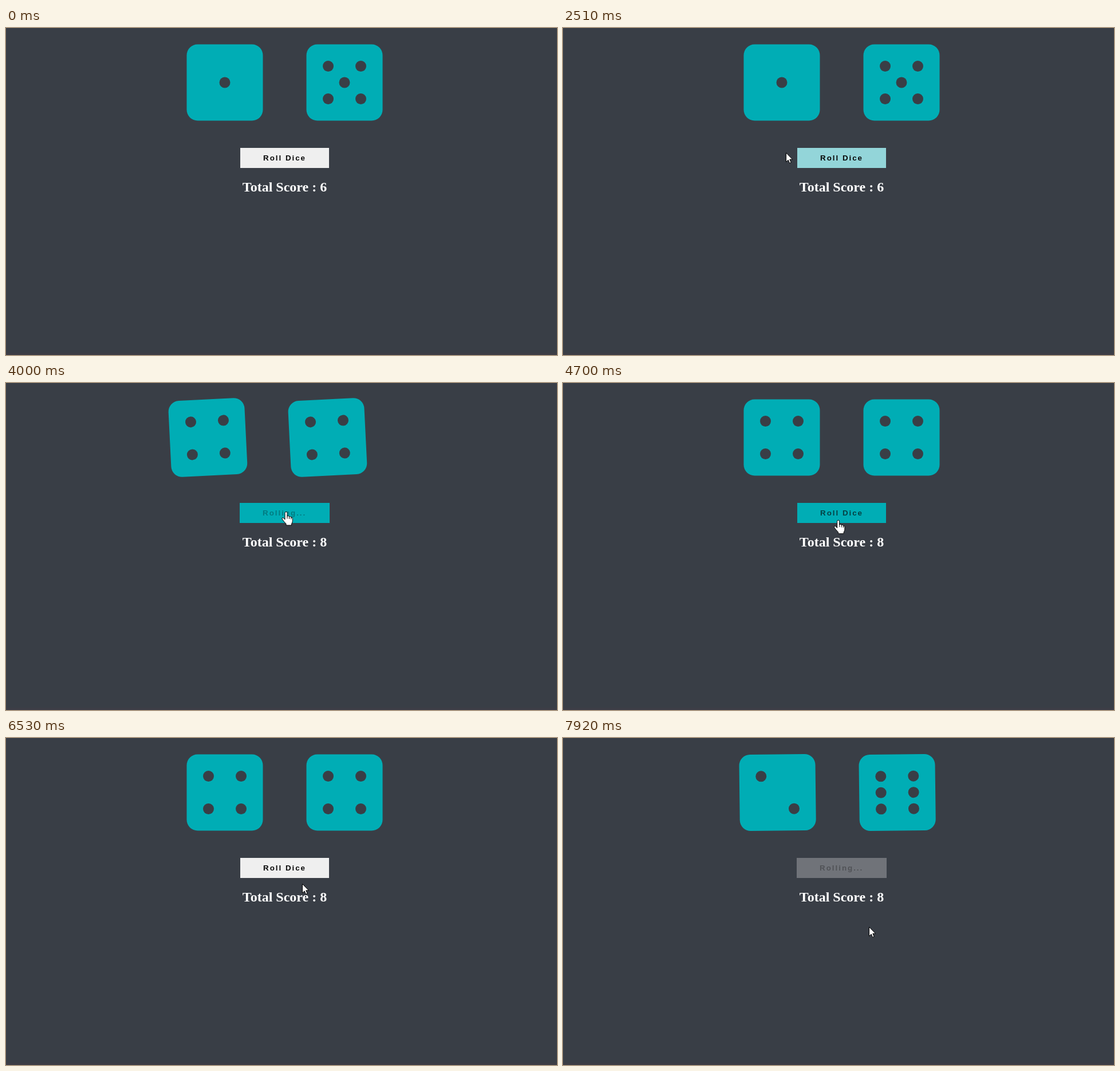
Recreate the animation shown at these times as an HTML page. Size 962 by 570 pixels, loop 7.99 s.

```html
<!DOCTYPE html>
<html lang="en">
<head>
<meta charset="utf-8">
<title>Roll Dice</title>
<style>
  html, body { margin: 0; width: 100%; height: 100%; overflow: hidden; background: #393e46; }
  svg { display: block; }
  #label { font: bold 13.333px "Liberation Sans", Arial, sans-serif; letter-spacing: 2px; }
  #score { font: bold 24px "Liberation Serif", "Times New Roman", serif; fill: #fff; text-anchor: middle; }
  .die rect { fill: #00adb5; }
  .die circle { fill: #393e46; }
  .cursor { fill: #fff; stroke: #000; stroke-linejoin: round; }
</style>
</head>
<body>
<svg width="962" height="570" viewBox="0 0 962 570">
  <rect width="962" height="570" fill="#393e46"/>
  <rect y="566" width="962" height="4" fill="#3d3d46"/>
  <g class="die"></g>
  <g class="die"></g>
  <rect id="button" y="209" height="35"/>
  <text id="label" y="231"></text>
  <text id="score" x="486.5" y="285"></text>
  <path id="arrow" class="cursor" d="M.5 .5V16.3L4.2 12.9 6.6 18.4 9.2 17.3 6.8 11.9H11.6Z"/>
  <g id="hand" class="cursor">
    <path d="M-2 2a2 2 0 0 1 4 0v5.5q2.5-1 3.5.8 2.6-.6 3.3 1.2 2.5 0 2.5 2.5v4q0 2.5-1.8 5v2.5h-9.5v-2.5q-4.5-4.5-7-8.5-.5-2.5 2-2.2l3 3.2z"/>
    <path d="M2 7v5M5.5 8.5v4M8.7 9.5v3.5" fill="none"/>
  </g>
</svg>
<script>
const LOOP = 7990, FADE = 400, ROLL = 1000;
const $ = id => document.getElementById(id);
const dice = [...document.querySelectorAll('.die')];
const FIRST_DIE = 382, DIE_SPAN = 209;

const rolls = [
  { start: -ROLL, faces: [1, 5] },
  { start: 3581, faces: [4, 4] },
  { start: 7121, faces: [2, 6] },
];

// Pointer's turning points: ms, x, y
const path = [
  [120, 891, 553], [610, 600, 90], [850, 364, 88], [950, 361, 90], [1370, 658, 79],
  [1650, 585, 203], [1790, 562, 218], [2372, 408, 218], [2510, 389, 217], [2700, 394, 250],
  [2950, 430, 290], [3330, 489, 224.5], [4450, 489, 224.5], [4750, 479, 242], [5100, 485, 243],
  [5450, 564, 300], [5800, 564, 298], [6530, 517, 254], [6800, 505, 230], [7130, 505, 230],
  [7390, 570, 278], [7920, 534, 329],
];

const clamp = v => Math.min(1, Math.max(0, v));
const mix = (a, b, p) => a + (b - a) * p;

// CSS "ease": cubic-bezier(.25, .1, .25, 1)
function ease(u) {
  if (u <= 0 || u >= 1) return clamp(u);
  const curve = (a, b, s) => 3 * a * s * (1 - s) ** 2 + 3 * b * s * s * (1 - s) + s ** 3;
  let low = 0, high = 1;
  for (let i = 0; i < 24; i++) {
    const s = (low + high) / 2;
    if (curve(.25, .25, s) < u) low = s; else high = s;
  }
  return curve(.1, 1, low);
}

// Six swings of alternating side and shrinking size; the last settles more slowly
function wobble(u) {
  const swing = k => k ? (-1) ** k * (.3 - .05 * k) : 0;
  const tilt = k => Math.min(3, 20 * swing(k));
  const k = Math.min(5, Math.floor(u / .15));
  const p = ease((u - k * .15) / (k < 5 ? .15 : .25));
  return { shift: mix(swing(k), swing(k + 1), p) * DIE_SPAN, turn: mix(tilt(k), tilt(k + 1), p) };
}

function pointerAt(t) {
  const next = path.findIndex(key => key[0] > t);
  if (next < 1) return (next ? path.at(-1) : path[0]).slice(1);
  const [t0, x0, y0] = path[next - 1], [t1, x1, y1] = path[next];
  const p = (t - t0) / (t1 - t0);
  return [mix(x0, x1, p), mix(y0, y1, p)];
}

function isOver(t) {
  const [x, y] = pointerAt(t);
  return x >= 409 && x <= 564 && y >= 209 && y <= 244;
}

// Spans of time the pointer spends on the button
const hovers = [];
for (let t = 1; t < LOOP; t++) {
  if (isOver(t) && !isOver(t - 1)) hovers.push([t, LOOP]);
  if (!isOver(t) && isOver(t - 1)) hovers.at(-1)[1] = t;
}

// Level of a switch that fades in at start and out at end
const fade = (t, [start, end]) => ease((t - start) / FADE) * (1 - ease((t - end) / FADE));

function pips(face) {
  const spots = [];
  if (face % 2) spots.push([0, 0]);
  if (face > 1) spots.push([-1, -1], [1, 1]);
  if (face > 3) spots.push([1, -1], [-1, 1]);
  if (face > 5) spots.push([-1, 0], [1, 0]);
  return spots.map(([x, y]) => `<circle cx="${x * 28.5}" cy="${y * 28.5}" r="9.5"/>`).join('');
}

let shownRoll;
function drawDice(roll, t) {
  if (roll !== shownRoll) {
    shownRoll = roll;
    dice.forEach((die, i) => die.innerHTML =
      '<rect x="-66.5" y="-66.5" width="133" height="133" rx="19"/>' + pips(roll.faces[i]));
    $('score').textContent = 'Total Score : ' + (roll.faces[0] + roll.faces[1]);
  }
  const { shift, turn } = wobble(clamp((t - roll.start) / ROLL));
  dice.forEach((die, i) => die.setAttribute('transform',
    `translate(${FIRST_DIE + i * DIE_SPAN + shift} 95) rotate(${turn})`));
}

function drawButton(roll, t) {
  const rolling = t < roll.start + ROLL;
  const width = rolling ? 157 : 155, left = rolling ? 408 : 409;
  const hover = Math.max(...hovers.map(span => fade(t, span)));
  const disabled = Math.max(...rolls.slice(1).map(r => fade(t, [r.start, r.start + ROLL])));
  const idle = rolling ? [112, 115, 121] : [239, 239, 239];
  const fill = idle.map((c, i) => Math.round(mix(c, [0, 173, 181][i], hover)));
  $('button').setAttribute('x', left);
  $('button').setAttribute('width', width);
  $('button').setAttribute('fill', `rgb(${fill})`);
  $('label').setAttribute('x', left + 40);
  $('label').setAttribute('fill', `rgba(8,8,8,${mix(1, .3, disabled)})`);
  $('label').textContent = rolling ? 'Rolling...' : 'Roll Dice';
}

function drawPointer(t) {
  const [x, y] = pointerAt(t);
  const shown = t < path[0][0] ? '' : isOver(t) ? 'hand' : 'arrow';
  for (const id of ['arrow', 'hand']) {
    $(id).setAttribute('visibility', id === shown ? 'visible' : 'hidden');
    $(id).setAttribute('transform', `translate(${x} ${y})`);
  }
}

const begin = performance.now();
function frame() {
  const t = (performance.now() - begin) % LOOP;
  const roll = rolls.findLast(r => t >= r.start);
  drawDice(roll, t);
  drawButton(roll, t);
  drawPointer(t);
  requestAnimationFrame(frame);
}
frame();
</script>
</body>
</html>
```
